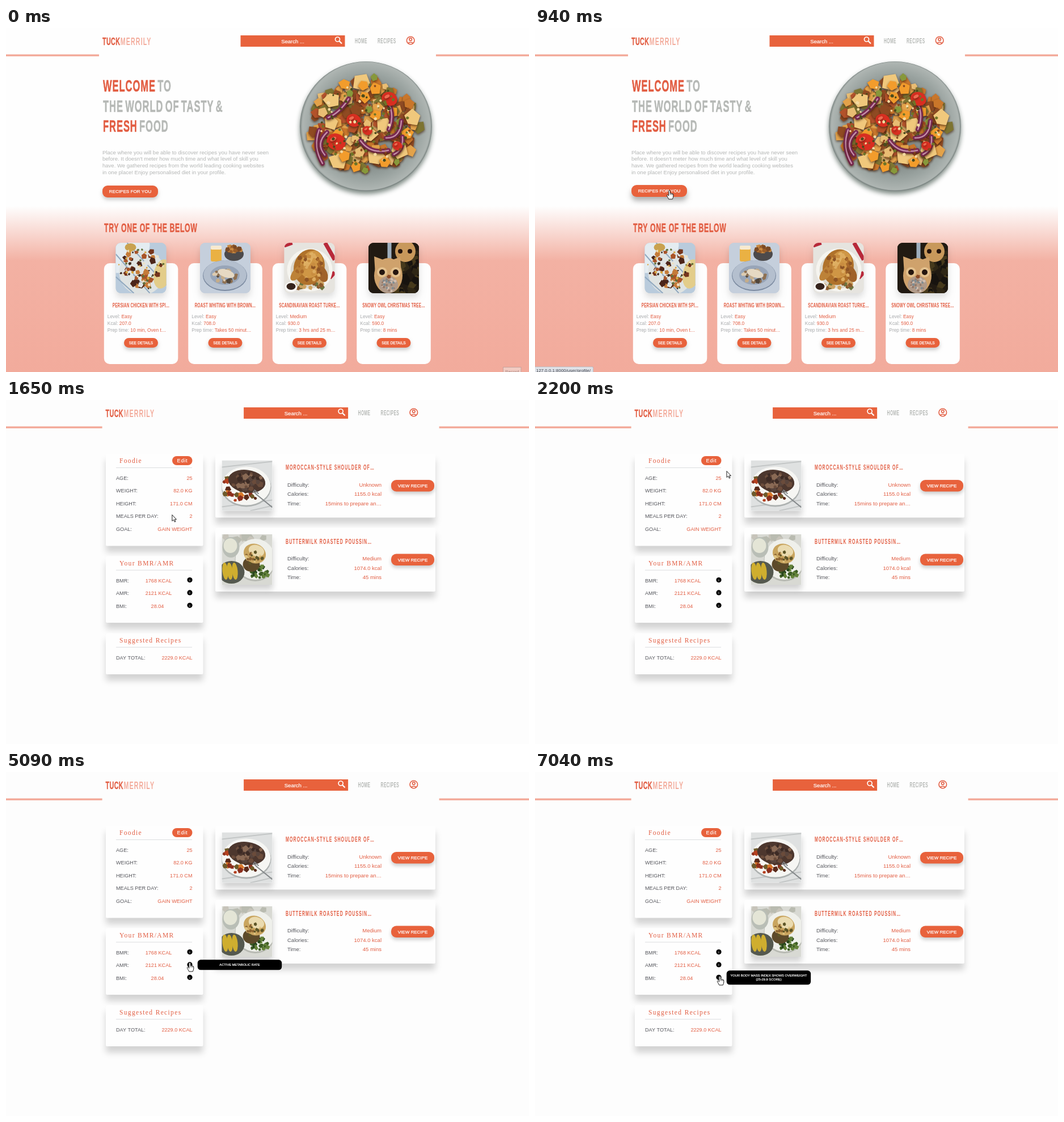
Write an HTML page with a canvas that moves like this. It is 922 px wide and 607 px high and loops after 8 s.

```html
<!DOCTYPE html>
<html lang="en">
<head>
<meta charset="utf-8">
<title>Recipe site</title>
<style>
  html, body { margin: 0; width: 100%; height: 100%; overflow: hidden; background: #fdfdfd; }
  canvas { display: block; }
</style>
</head>
<body>
<canvas id="stage" width="922" height="607"></canvas>
<script>
const W = 922, H = 607, LOOP = 8000;
const ORANGE = '#e8623c', RED = '#e25d42', GREY = '#b6b9b6', SALMON = '#f3ac9c', DARK = '#55565c';
const SANS = '"Liberation Sans", sans-serif', SERIF = '"Liberation Serif", serif';
const stage = document.getElementById('stage').getContext('2d');
let g = stage;
let seed = 1;
const random = () => (seed = seed * 16807 % 2147483647) / 2147483647;

// ---- drawing helpers ----
function text(str, x, y, size, color, { align = 'left', spacing = 0, family = SANS, stroke = 0 } = {}) {
  g.font = `${size}px ${family}`;
  g.letterSpacing = spacing + 'px';
  g.textAlign = align;
  g.fillStyle = g.strokeStyle = color;
  g.fillText(str, x, y);
  if (stroke) {
    g.lineWidth = stroke;
    g.strokeText(str, x, y);
  }
  return x + g.measureText(str).width;
}

// Condensed poster lettering: one fixed narrowing for every title.
const NARROW = .56;
function poster(str, x, y, size, color, { align = 'left', spacing = 0, words = 0, stroke = .02 } = {}) {
  g.save();
  g.translate(x, y);
  g.scale(NARROW, 1);
  g.font = `bold ${size}px ${SANS}`;
  g.letterSpacing = spacing + 'px';
  g.wordSpacing = words + 'px';
  g.textAlign = align;
  g.fillStyle = g.strokeStyle = color;
  g.lineWidth = size * stroke;
  g.fillText(str, 0, 0);
  if (stroke) g.strokeText(str, 0, 0);
  const width = g.measureText(str).width * NARROW;
  g.restore();
  return x + width;
}

function box(x, y, w, h, r, color, shadow) {
  g.save();
  if (shadow) [g.shadowOffsetY, g.shadowBlur, g.shadowColor] = shadow;
  g.fillStyle = color;
  g.beginPath();
  g.roundRect(x, y, w, h, r);
  g.fill();
  g.restore();
}

function button(label, x, y, w, h, size, shadow = [4, 6, 'rgba(0,0,0,.2)']) {
  box(x, y, w, h, Math.min(h / 2, 9), ORANGE, shadow);
  text(label, x + w / 2, y + h / 2 + size * .35, size, '#fff', { align: 'center', stroke: .25 });
}

function oval(x, y, rx, ry, color, turn = 0) {
  g.fillStyle = color;
  g.beginPath();
  g.ellipse(x, y, rx, ry, turn, 0, 7);
  g.fill();
}

function chunk(x, y, size, color) {
  const turn = random() * 6;
  g.fillStyle = color;
  g.beginPath();
  for (let i = 0; i < 5; i++) {
    const a = turn + i * 1.257, r = size * (.75 + random() * .4);
    g.lineTo(x + r * Math.cos(a), y + r * Math.sin(a));
  }
  g.fill();
}

function scatter(count, cx, cy, rx, ry, size, colors) {
  for (let i = 0; i < count; i++) {
    const a = random() * 6.28, r = Math.sqrt(random());
    chunk(cx + rx * r * Math.cos(a), cy + ry * r * Math.sin(a), size * (.6 + random() * .6), colors[i % colors.length]);
  }
}

function line(color, width, path) {
  g.strokeStyle = color;
  g.lineWidth = width;
  g.stroke(new Path2D(path));
}

function photo(x, y, radius, background, draw) {
  g.save();
  g.translate(x, y);
  g.beginPath();
  g.roundRect(0, 0, 89, 89, radius);
  g.clip();
  g.fillStyle = background;
  g.fillRect(0, 0, 89, 89);
  draw();
  g.restore();
}

// ---- food ----
function heroPlate() {
  g.save();
  g.shadowColor = 'rgba(40,60,50,.6)';
  g.shadowBlur = 8;
  g.shadowOffsetY = 5;
  oval(634.5, 173.5, 116.5, 114.5, '#7f8886');
  const glaze = g.createRadialGradient(635, 173, 70, 635, 173, 116);
  glaze.addColorStop(0, '#858e8b');
  glaze.addColorStop(.5, '#9aa3a0');
  glaze.addColorStop(.92, '#aeb5b2');
  glaze.addColorStop(1, '#868f8c');
  g.shadowColor = 'transparent';
  oval(634.5, 173, 115.5, 113.5, glaze);

  g.shadowColor = 'rgba(60,25,5,.7)';
  g.shadowBlur = 4;
  g.shadowOffsetY = 2;
  scatter(240, 632, 173, 96, 80, 10, ['#c9762a', '#8f4a22', '#e3a24a', '#7d7431', '#b3522a', '#e9bd73']);
  const pieces = [
    ['#f0c87c', 16, [[574, 127], [573, 166], [668, 172], [716, 159], [586, 234], [640, 187], [693, 215], [653, 228], [628, 97]]],
    ['#f29c2c', 11, [[596, 99], [630, 101], [650, 107], [680, 148], [584, 188], [653, 155], [708, 187], [597, 226], [617, 245], [668, 238], [633, 121]]],
    ['#87983b', 7, [[650, 87], [607, 115], [640, 143], [694, 166], [634, 252], [689, 236]]]
  ];
  for (const [color, size, spots] of pieces) for (const [x, y] of spots) chunk(x, y, size, color);
  g.lineCap = 'round';
  const onions = ['M568 158Q588 150 604 125', 'M552 180Q541 210 558 239', 'M566 184Q545 204 562 224',
    'M668 121Q688 150 675 179', 'M670 194Q695 195 697 164', 'M625 199Q642 223 674 216', 'M684 223Q701 215 699 192'];
  for (const path of onions) {
    line('#7e2a56', 8, path);
    line('#c48aa8', 2.5, path);
  }
  for (const [x, y, r] of [[676, 125, 14], [582, 201, 17], [613, 163, 13], [690, 208, 9], [637, 181, 9]]) {
    oval(x, y, r, r * .85, '#d92e20', .4);
    oval(x - r * .3, y - r * .3, r * .35, r * .2, '#ee6a50', -.5);
  }
  g.shadowColor = 'transparent';
  scatter(110, 634, 170, 84, 74, 3, ['#4a4a1c', '#6f7428', '#8a4a20', '#f3d9a0']);
  g.restore();
}

function persianChicken() {
  oval(20, 20, 45, 26, '#e4ecf1', -.6);
  oval(46, 52, 40, 40, '#dfe3e2', .6);
  line('#91a9c0', 2, 'M0 20L60 89M20 0L89 75M0 60L32 89');
  oval(82, 55, 15, 26, '#e3cd8a', .2);
  oval(26, 8, 10, 7, '#c9a250');
  scatter(40, 46, 46, 37, 34, 6, ['#75351d', '#a95327', '#4b251a', '#c57b39', '#dfe4e4']);
  scatter(45, 45, 45, 40, 38, 2.5, ['#617039', '#eee1c5', '#3d2a20', '#d8a33f']);
}

function roastWhiting() {
  box(19, 8, 19, 25, 3, '#eab143');
  box(19, 5, 19, 7, 2, '#f7ead0');
  oval(60, 20, 17, 12, '#4c4a4b');
  scatter(18, 60, 12, 13, 6, 5, ['#c98a42', '#9a5e2a', '#7a4a26']);
  oval(44, 58, 39, 27, '#7b8aa0');
  oval(44, 57, 38, 26, '#b4bfce');
  oval(44, 57, 26, 17, '#98a5b8');
  scatter(26, 43, 59, 21, 11, 4, ['#8f7152', '#51463a', '#c6ad89', '#dccbb0']);
  oval(46, 54, 15, 7, '#e6d9c3', .3);
}

function roastTurkey() {
  line('#b8293a', 7, 'M72 0L89 30M0 5L14 0M80 62L89 52');
  oval(45, 48, 40, 38, '#f5f4ef');
  oval(45, 49, 34, 32, '#dcd8cc');
  scatter(18, 40, 75, 30, 7, 5, ['#6c7440', '#cda260', '#8c5a2c']);
  oval(44, 43, 27, 32, '#b0722b', .3);
  oval(48, 38, 19, 25, '#cf9645', .4);
  oval(24, 52, 8, 18, '#bd8238', .7);
  oval(67, 55, 9, 15, '#a0622a', -.4);
  oval(43, 30, 6, 15, '#dfb063', .5);
  scatter(36, 45, 45, 23, 27, 4, ['#c98d40', '#a9692b', '#ddac60', '#8d5425']);
  oval(12, 78, 11, 9, '#f8f8f6');
  oval(12, 77, 8, 6, '#35231c');
}

function snowyOwl() {
  scatter(40, 70, 55, 30, 45, 8, ['#2f2716', '#17130f', '#46391c']);
  line('#9eaebd', 7, 'M37 0V32');
  oval(65, 15, 18, 19, '#c8985b');
  for (const x of [56, 73]) oval(x, 15, 4, 4, '#24140d');
  oval(35, 58, 25, 31, '#cfa26c');
  g.fillStyle = '#cfa26c';
  g.fill(new Path2D('M10 24L34 33 56 25 58 55 12 55Z'));
  oval(35, 74, 17, 15, '#b09a89');
  scatter(30, 35, 74, 14, 13, 2.5, ['#d0beb0', '#94796a', '#7f8c92']);
  for (const x of [24, 48]) {
    oval(x, 52, 9, 9, '#e3c08d');
    oval(x, 52, 5, 5, '#25160f');
  }
  chunk(36, 60, 4, '#8a4a28');
}

function lambShoulder() {
  line('#c3c6c6', 2, 'M0 12L89 2M0 82L89 70M50 89L89 80');
  oval(43, 47, 44, 35, '#aeb2b1');
  oval(43, 45, 43, 34, '#f6f6f3');
  scatter(50, 38, 48, 37, 25, 5, ['#b5401f', '#d9772b', '#8c2f1c', '#6e5a2b', '#5a2a1a']);
  oval(44, 37, 33, 20, '#4d372e', .15);
  scatter(34, 44, 37, 29, 16, 5, ['#3d2b25', '#6b4c3b', '#59453d', '#8a6a55']);
  line('#85898b', 2, 'M89 83L62 61M62 61l-7-7M65 59l-8-7');
}

function roastPoussin() {
  scatter(7, 45, 6, 42, 6, 9, ['#b9bbb0', '#c7c4ba']);
  oval(59, 46, 36, 37, '#b8bab3');
  oval(59, 44, 35, 36, '#eff0eb');
  oval(16, 23, 15, 18, '#b9beb6');
  oval(15, 20, 12, 13, '#e4e5d6');
  oval(17, 67, 23, 20, '#55594f');
  for (const x of [6, 14, 23]) oval(x, 65, 5, 15, '#cfae2f', -.1);
  scatter(34, 66, 66, 17, 11, 4, ['#3e5e24', '#64833a', '#28451c']);
  oval(52, 53, 15, 13, '#5d4a2a');
  oval(58, 34, 20, 17, '#c9a55f', .4);
  oval(61, 29, 14, 10, '#eadbb0', .3);
  scatter(20, 56, 42, 15, 11, 3, ['#8b6330', '#5d5527', '#e0c584']);
}

// ---- pages ----
function header(dx) {
  g.fillStyle = SALMON;
  g.fillRect(0, 46.5, 164 + dx, 3.5);
  g.fillRect(758 + dx, 46.5, W, 3.5);
  const next = poster('TUCK', 170 + dx, 30, 19, RED, { spacing: .8 });
  poster('MERRILY', next + .5, 30, 19, SALMON, { spacing: 2, stroke: 0 });
  g.fillStyle = ORANGE;
  g.fillRect(413.5 + dx, 13, 184, 20);
  text('Search ...', 505.5 + dx, 26.5, 9.5, '#fff', { align: 'center', stroke: .2 });
  poster('HOME', 615 + dx, 26.5, 12, GREY, { spacing: .8, stroke: 0 });
  poster('RECIPES', 655 + dx, 26.5, 12, GREY, { spacing: .8, stroke: 0 });
  g.save();
  g.translate(dx, 0);
  g.lineCap = 'butt';
  line('#fff', 1.7, 'M588.5 20a4 4 0 1 0-8 0 4 4 0 1 0 8 0');
  line('#fff', 2.2, 'M587 22.5L592 27.5');
  line(RED, 1.6, 'M720 22a6.8 6.8 0 1 0-13.6 0 6.8 6.8 0 1 0 13.6 0M715.5 20a2.3 2.3 0 1 0-4.6 0 2.3 2.3 0 1 0 4.6 0M708.5 27Q713.2 23 718 27');
  g.restore();
}

const RECIPES = [
  ['PERSIAN CHICKEN WITH SPI…', 'Easy', '207.0', '10 min, Oven t…', '#b9cbdc', persianChicken],
  ['ROAST WHITING WITH BROWN…', 'Easy', '708.0', 'Takes 50 minut…', '#c5cfdc', roastWhiting],
  ['SCANDINAVIAN ROAST TURKE…', 'Medium', '930.0', '3 hrs and 25 m…', '#e6e4df', roastTurkey],
  ['SNOWY OWL CHRISTMAS TREE…', 'Easy', '590.0', '8 mins', '#211a12', snowyOwl]
];

function home(hover) {
  const sky = g.createLinearGradient(0, 314, 0, H);
  [[0, '#fefefe'], [.33, '#f3b1a3'], [1, '#f2ab9c']].forEach(stop => sky.addColorStop(...stop));
  g.fillStyle = sky;
  g.fillRect(0, 0, W, H);
  header(0);

  const hero = { words: -4, spacing: 1.7 };
  let x = poster('WELCOME ', 171, 112, 29.5, RED, hero);
  poster('TO', x, 112, 29.5, GREY, hero);
  poster('THE WORLD OF TASTY &', 171, 147.7, 29.5, GREY, hero);
  x = poster('FRESH ', 171, 183.4, 29.5, RED, hero);
  poster('FOOD', x, 183.4, 29.5, GREY, hero);

  ['Place where you will be able to discover recipes you have never seen',
    "before. It doesn't meter how much time and what level of skill you",
    'have. We gathered recipes from the world leading cooking websites',
    'in one place! Enjoy personalised diet in your profile.'
  ].forEach((row, i) => text(row, 170, 222.5 + i * 11.9, 9.52, '#b4b6b5'));
  button('RECIPES FOR YOU', 170, hover ? 277 : 278, 98, 21, 8.1, hover ? [7, 10, 'rgba(0,0,0,.3)'] : undefined);
  heroPlate();

  poster('TRY ONE OF THE BELOW', 173, 360, 22, RED, { spacing: 1.1 });
  RECIPES.forEach(([title, level, kcal, time, tone, draw], i) => {
    const left = 172.8 + i * 148.5, mid = left + 65.2;
    box(left, 415, 130.5, 178, 10, '#fefefe');
    box(mid - 44.5, 379, 89, 89, 9, tone, [7, 12, 'rgba(0,0,0,.13)']);
    photo(mid - 44.5, 379, 9, tone, draw);
    poster(title, mid, 492.5, 11.4, RED, { align: 'center', spacing: .35, stroke: 0 });
    [['Level: ', level], ['Kcal: ', kcal], ['Prep time: ', time]].forEach(([label, value], row) => {
      const y = 512 + row * 12.1;
      text(value, text(label, left + 6, y, 8.4, '#a9abad'), y, 8.4, RED);
    });
    button('SEE DETAILS', mid - 30, 547, 60, 17, 6.7);
  });
}

const CARD_SHADOW = [11, 12, 'rgba(0,0,0,.17)'];

function panel(title, top, height, rows) {
  box(176, top, 171.5, height, 2, '#fefefe', CARD_SHADOW);
  text(title, 200, top + 16, 11.5, RED, { family: SERIF, spacing: 1.35 });
  g.fillStyle = '#dcdde0';
  g.fillRect(194, top + 24, 134, 1);
  rows.forEach(([label, value, center], i) => {
    const y = top + 46 + i * 22.4;
    text(label, 194, y, 9.1, DARK);
    text(value, center || 328.5, y, 9.1, RED, { align: center ? 'center' : 'right' });
    if (center) {
      oval(324, y - 4.2, 4.6, 4.6, '#000');
      text('i', 324, y - 1.7, 7, '#fff', { align: 'center', family: SERIF });
    }
  });
}

function suggestion(title, top, values, tone, draw, loaded) {
  box(369, top, 388, 112.5, 2, '#fefefe', CARD_SHADOW);
  box(380.5, top + 11.5, 89, 89, 0, '#fefefe', [8, 10, 'rgba(0,0,0,.18)']);
  if (loaded) photo(380.5, top + 11.5, 0, tone, draw);
  poster(title, 493, top + 28, 12.5, RED, { spacing: 2, stroke: 0 });
  ['Difficulty:', 'Calories:', 'Time:'].forEach((label, i) => {
    const y = top + 57.7 + i * 16.5;
    text(label, 496, y, 9.5, DARK);
    text(values[i], 662, y, 9.5, RED, { align: 'right' });
  });
  button('VIEW RECIPE', 679, top + 46, 76, 20.5, 8);
}

function profile(loaded) {
  g.fillStyle = '#fdfdfd';
  g.fillRect(0, 0, W, H);
  header(5.6);
  panel('Foodie', 95, 162.5, [['AGE:', '25'], ['WEIGHT:', '82.0 KG'], ['HEIGHT:', '171.0 CM'],
    ['MEALS PER DAY:', '2'], ['GOAL:', 'GAIN WEIGHT']]);
  box(293, 99, 35.5, 16, 8, ORANGE);
  text('Edit', 311, 110.3, 9.1, '#fff', { align: 'center', spacing: .8, stroke: .2 });
  panel('Your BMR/AMR', 275.7, 117.3, [['BMR:', '1768 KCAL', 269], ['AMR:', '2121 KCAL', 269], ['BMI:', '28.04', 267]]);
  panel('Suggested Recipes', 411.7, 72.3, [['DAY TOTAL:', '2229.0 KCAL']]);
  suggestion('MOROCCAN-STYLE SHOULDER OF…', 95, ['Unknown', '1155.0 kcal', '15mins to prepare an…'], '#dfe1e1', lambShoulder, loaded);
  suggestion('BUTTERMILK ROASTED POUSSIN…', 225.5, ['Medium', '1074.0 kcal', '45 mins'], '#d8d9d3', roastPoussin, loaded);
}

function render(draw, flag) {
  const page = document.createElement('canvas');
  page.width = W;
  page.height = H;
  g = page.getContext('2d');
  seed = 77;
  draw(flag);
  g = stage;
  return page;
}
const pages = {
  home: render(home, false), hover: render(home, true),
  empty: render(profile, false), loaded: render(profile, true)
};

// ---- overlays ----
const ARROW = new Path2D('M0 0V11L2.6 8.8 4.4 12.6 6.1 11.9 4.4 8.2H7.6Z');
const HAND = new Path2D('M-1.3 1.3Q0-.8 1.3 1.3V5.4Q2.6 4.9 3.2 5.9 4.6 5.4 5.1 6.5 6.8 6.4 6.8 8V11Q6.6 13.5 5.3 16H-1.3Q-3 12.8-4.6 9.6-4.7 8.1-3.2 8.3L-1.3 10.2Z');

const TRACK = [[70, 882, 588], [300, 610, 420], [480, 481, 358], [780, 246, 296], [940, 237, 286],
  [1320, 237, 286], [1800, 318, 165], [2060, 341, 116], [2130, 340, 118], [2200, 338, 125], [2450, 328, 250], [2680, 321.5, 323],
  [3550, 321.5, 322.5], [3750, 321.5, 323], [4020, 323, 335], [4490, 323, 335], [4620, 324, 336],
  [5090, 324, 336], [5440, 322, 360], [5900, 322, 360], [6100, 325, 360], [7040, 326, 360]];

function cursorAt(t) {
  const i = TRACK.findIndex(key => key[0] > t);
  if (i < 0) return TRACK[TRACK.length - 1].slice(1);
  const [t0, x0, y0] = TRACK[i - 1], [t1, x1, y1] = TRACK[i], k = (t - t0) / (t1 - t0);
  return [x0 + (x1 - x0) * k, y0 + (y1 - y0) * k];
}

const TIPS = [
  { from: 2610, to: 3890, y: 309, h: 18, lines: ['BASAL METABOLIC RATE'] },
  { from: 3950, to: 5230, y: 331.3, h: 18, lines: ['ACTIVE METABOLIC RATE'] },
  { from: 5300, to: LOOP, y: 350.3, h: 25, lines: ['YOUR BODY MASS INDEX SHOWS OVERWEIGHT', '(25-29.9 SCORE)'] }
];

function cursor(t, hand) {
  g.save();
  g.translate(...cursorAt(t));
  const shape = hand ? HAND : ARROW;
  g.fillStyle = '#fff';
  g.fill(shape);
  g.strokeStyle = '#1c1c1c';
  g.lineWidth = 1;
  g.stroke(shape);
  if (hand) line('#1c1c1c', .7, 'M1.3 5.4V8.5M3.2 6V8.6M5.1 6.6V8.8');
  g.restore();
}

function draw(t) {
  const page = t < 780 ? 'home' : t < 1140 ? 'hover' : t < 1320 ? 'empty' : 'loaded';
  g.drawImage(pages[page], 0, 0);

  if (t < 70) {
    box(876.5, 598.5, 31.5, 12, 1, '#f1cbc2');
    g.strokeStyle = '#c9a29b';
    g.lineWidth = 1;
    g.strokeRect(876.5, 598.5, 31.5, 12);
    text('Record', 880, 609, 7.6, '#a98680');
  }
  if (t >= 870 && t < 1400) {
    box(-2, 597.5, 105, 12, 2, '#b4b8bf');
    box(-2, 598.3, 104.2, 12, 2, '#dfe2e8');
    text('127.0.0.1:8000/user/profile/', 2, 606.5, 7.9, '#43474f');
  }

  const tip = TIPS.find(({ from, to }) => t >= from && t < to);
  if (tip) {
    box(337.7, tip.y, 148.5, tip.h, 5.5, '#000');
    const first = tip.y + tip.h / 2 + 2 - (tip.lines.length - 1) * 3.5;
    tip.lines.forEach((row, i) => text(row, 412, first + i * 7, 5.72, '#fff', { align: 'center', stroke: .2 }));
  }
  if (t >= 70) cursor(t, tip || (t >= 780 && t < 1390));
}

const start = performance.now();
function tick() {
  draw((performance.now() - start) % LOOP);
  requestAnimationFrame(tick);
}
tick();
</script>
</body>
</html>
```
